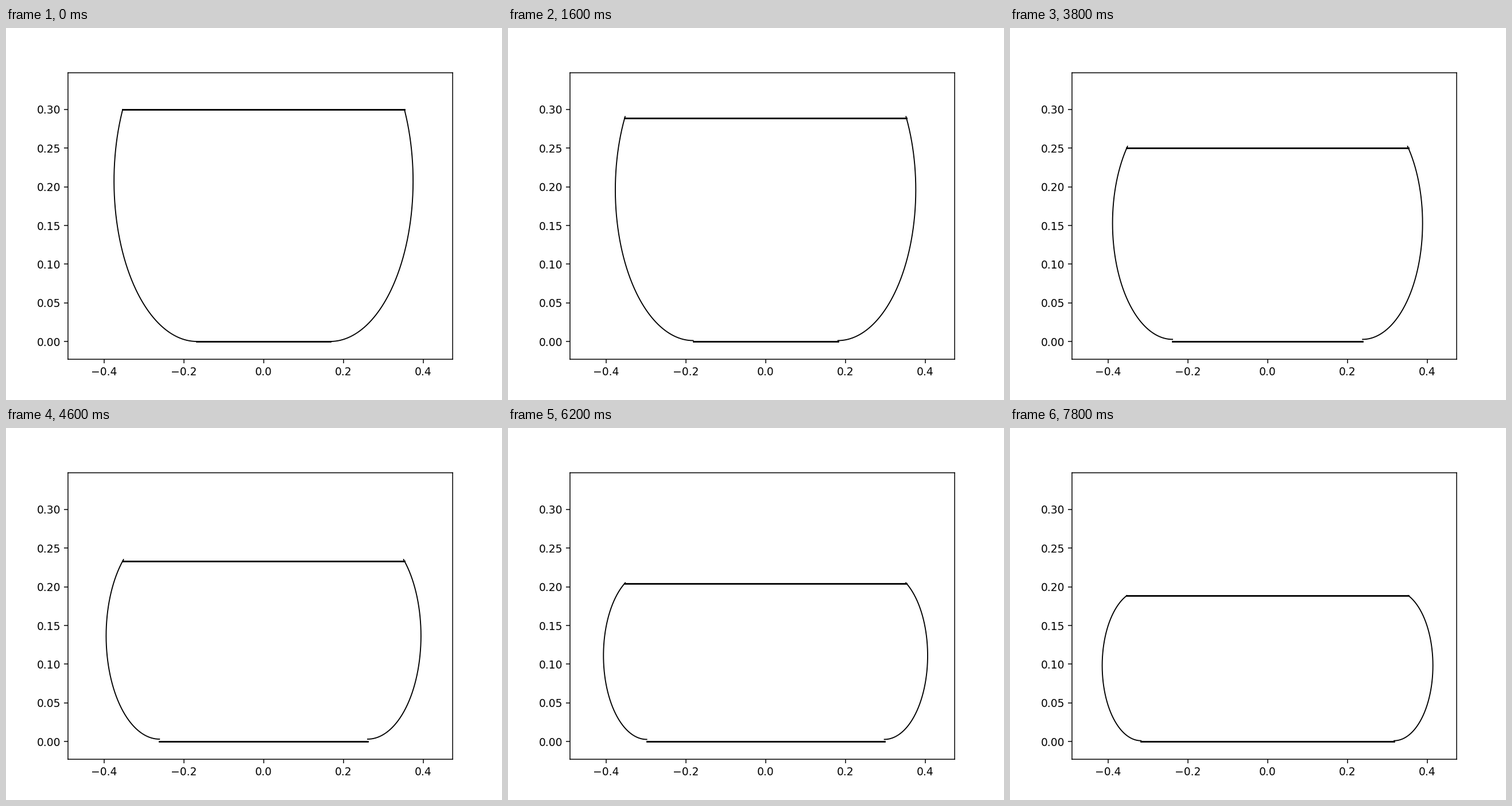
Animation, 864 px wide and 648 px high, one loop 8 s. Source, as a matplotlib script:

```python
import numpy as np
import matplotlib.pyplot as plt
from matplotlib.animation import FuncAnimation

FRAMES, STEP = 40, 200
DT = 0.01                     # model seconds per frame
MASS, GRAVITY, PRESSURE = 100, 9.81, 2000
PLATE = 0.353                 # half width of the top plate
SKIN = 3 * np.pi / 16         # half length of the skin below it
START = 0.3


def cushion(h):
    """Contact half width, arc radius and end angle for a plate at height h."""
    low, high = 0.0, 1.5
    for _ in range(40):
        angle = (low + high) / 2
        r = h / (1 + np.sin(angle))
        base = PLATE - r * np.cos(angle)
        if base + r * (np.pi / 2 + angle) < SKIN:
            low = angle
        else:
            high = angle
    return base, r, angle


def simulate():
    """Euler steps: the skin follows the plate one step behind."""
    h, v, poses = START, 0.0, []
    for _ in range(FRAMES):
        shape = cushion(h)
        h += v * DT
        v += (2 * PRESSURE * shape[0] / MASS - GRAVITY) * DT
        poses.append((h, *shape))
    return poses


poses = simulate()

fig, ax = plt.subplots(figsize=(6.4, 4.8), dpi=135)
ax.set_xlim(-0.4901, 0.4733)
ax.set_ylim(-0.0228, 0.3477)

top, = ax.plot([], [], "k", lw=1.5)
bottom, = ax.plot([], [], "k", lw=1.5)
left, = ax.plot([], [], "k", lw=1)
right, = ax.plot([], [], "k", lw=1)


def update(i):
    h, base, y0, angle = poses[i]
    top.set_data([-PLATE, PLATE], [h, h])
    bottom.set_data([-base, base], [0, 0])
    # the arc's radius reaches from its centre to the plate's corner
    r = np.hypot(PLATE - base, h - y0)
    a = np.linspace(-np.pi / 2, angle, 200)
    x, y = base + r * np.cos(a), y0 + r * np.sin(a)
    right.set_data(x, y)
    left.set_data(-x, y)
    return top, bottom, left, right


anim = FuncAnimation(fig, update, frames=FRAMES, interval=STEP,
                     repeat=True, repeat_delay=0)
plt.show()
```
